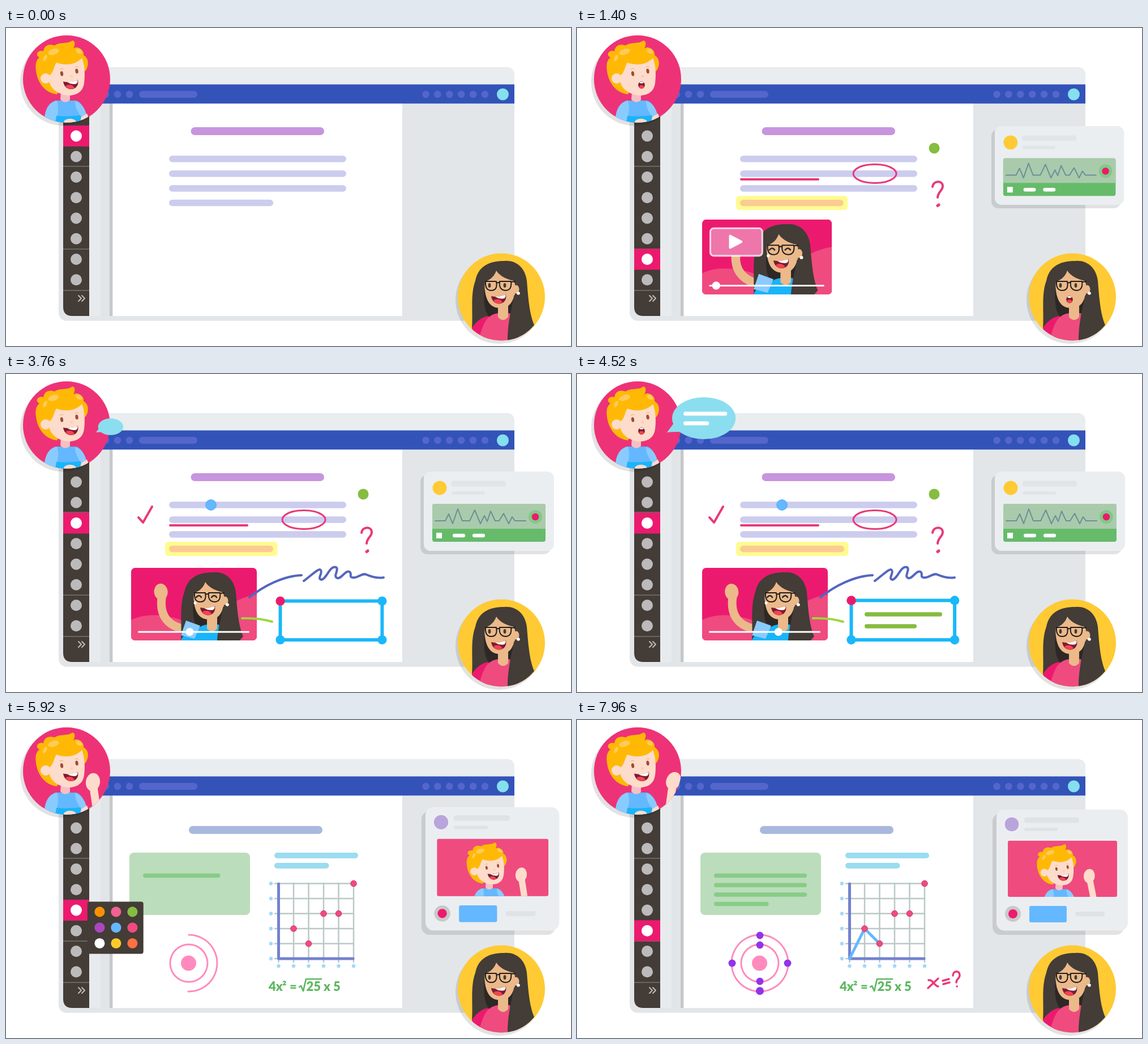
Animation of 998x561 px, one loop 8 s. Source, as an HTML page:

```html
<!DOCTYPE html>
<html lang="en">
<head>
<meta charset="utf-8">
<title>Shared whiteboard lesson</title>
<style>
html, body { margin: 0; width: 100%; height: 100%; overflow: hidden; background: #fff; }
svg { display: block; width: 100vw; height: 100vh; }
path, line { stroke-linecap: round; stroke-linejoin: round; }
text { font: 900 22px Lato, sans-serif; fill: #5cb85f; }
</style>
</head>
<body>
<svg id="stage" viewBox="0 0 998 561"></svg>
<script>
const LOOP = 8000;
const PINK = '#ec1a6e', ROSE = '#ef4b7f', DARK = '#433c37', SKIN = '#fddccb', TAN = '#ecb98a',
      BLUE = '#64b8ff', INK = '#e8397a', GREEN = '#86bc40', INDIGO = '#5566bf', SHADOW = 'rgba(0,0,0,.115)';

// ---------- shape helpers ----------
const attr = (id, extra = '') => (id ? ` id="${id}"` : '') + ' ' + extra;
const rect = (x, y, x2, y2, fill, r = 0, id, extra) =>
  `<rect x="${x}" y="${y}" width="${x2 - x}" height="${y2 - y}" rx="${r}" fill="${fill}"${attr(id, extra)}/>`;
const dot = (x, y, r, fill, id, extra) => `<circle cx="${x}" cy="${y}" r="${r}" fill="${fill}"${attr(id, extra)}/>`;
const oval = (x, y, rx, ry, fill, turn = 0) =>
  `<ellipse cx="${x}" cy="${y}" rx="${rx}" ry="${ry}" fill="${fill}" transform="rotate(${turn} ${x} ${y})"/>`;
const fill = (d, color) => `<path d="${d}" fill="${color}"/>`;
const pen = (d, color, w = 4, id, extra) =>
  `<path d="${d}" fill="none" stroke="${color}" stroke-width="${w}"${id ? ' pathLength="1"' : ''}${attr(id, extra)}/>`;
const bar = (x, x2, y, h, color, id) => pen(`M${x + h / 2},${y}H${x2 - h / 2}`, color, h, id);
const group = (id, ...parts) => `<g${attr(id)}>${parts.join('')}</g>`;
const place = (transform, ...parts) => `<g transform="${transform}">${parts.join('')}</g>`;
const clip = (name, ...parts) => `<g clip-path="url(#${name})">${parts.join('')}</g>`;
const range = (n, f) => Array.from({ length: n }, (_, i) => f(i)).join('');

// ---------- characters ----------
const smile = fill('M0,0Q14,3 26,-3C28,7 22,13 15,13.5C7,14 1,8 0,0Z', '#7d1b33') +
  fill('M7,1Q16,1 25.5,-2.5Q26,2 23,4Q15,6 7,1Z', '#fff') +
  fill('M4,8C8,4 17,5 20,11C15,15 8,14 4,8Z', '#f4434f');
const gasp = oval(13, 6, 5.8, 6.5, '#7d1b33') + oval(13, 9.2, 4, 3, '#f4434f') + oval(13, 1.6, 3.6, 1.6, '#fff');
const mouth = (x, y, who) => place(`translate(${x} ${y})`, group(who && who + 'Smile', smile),
  who ? group(who + 'Gasp', gasp) : '');

const boy = who => [
  fill('M67,168C70,145 74,132 88,128L124,128C135,132 140,144 146,168Z', BLUE),
  fill('M67,168C68,146 73,132 90,128C94,140 92,152 86,168Z', '#8acbff'),
  fill('M122,129C134,132 139,142 142,152L133,158C127,148 122,140 122,129Z', '#8acbff'),
  fill('M89,155Q108,157 132,154L134,168H87Z', '#1ab4fa'),
  fill('M133,157L143,151L150,168H130Z', SKIN), oval(113, 166, 11, 6, SKIN),
  fill('M97,112H113V127Q104,135 96,126Z', '#f7bfc4'),
  group(who && who + 'Head',
    fill('M90,117C70,115 56,98 53,76C51,62 54,56 59,52C49,46 59,38 66,41C68,29 78,28 86,31C93,24 110,29 117,22C123,23 122,30 119,36C129,30 139,42 137,48C148,54 146,69 140,76L110,80Z', '#ffb905'),
    fill('M76,84C84,80 84,68 89,61C108,68 125,63 134,53C139,65 140,82 138,97C136,113 124,119 111,119C94,118 81,109 77,97Z', SKIN),
    dot(70, 89, 9, SKIN), oval(84, 42, 10, 5, '#fecb5a', -18), oval(129, 41, 6, 3.8, '#fecb5a', 30),
    oval(69, 53, 3, 6, '#fecb5a', 25),
    group(who && who + 'Eyes', oval(98.5, 80.5, 2.6, 4.3, '#a04c34', -8), oval(125, 76, 2.6, 4.3, '#a04c34', -8)),
    pen('M95,73Q98,70 101,72M122,69Q125,67 128,69', '#f0ab69', 1), oval(116, 85, 3, 2, '#fbcdbb'),
    mouth(101, 94.5, who))
].join('');

const girl = (shirt, sleeve, who) => [
  fill('M838,440H900L892,525H838Z', '#2d2826'),
  fill('M823,530Q834,508 853,508V552H838Q828,545 823,530Z', sleeve),
  fill('M835,552C842,520 850,505 870,503H890L905,552Z', shirt),
  fill('M869,485H887V510Q878,520 869,510Z', TAN),
  group(who && who + 'Head',
    fill('M845,446Q858,440 866,427Q876,442 900,446C900,478 893,494 873,494C852,494 845,476 845,446Z', TAN),
    who ? group(who + 'Eyes', oval(854, 454, 2.4, 4, DARK), oval(881, 454, 2.4, 4, DARK))
        : pen('M850,455Q855,449 859,455M877,455Q882,449 886,455', '#2d2826', 2.5),
    mouth(857, 473, who)),
  fill('M866,428C862,440 852,446 846,447C844,470 842,492 852,508C839,510 829,519 823,530C825,500 820,470 829,446C834,421 852,411 880,411Z', DARK),
  fill('M866,428C874,440 888,444 897,446C904,470 886,500 886,551C907,549 922,537 933,524C924,504 922,470 920,446C917,422 900,409 880,411C867,412 862,420 866,428Z', DARK),
  oval(901, 461, 5.5, 7.5, TAN), fill('M893,450H899V470L893,478Z', TAN),
  pen('M847,447H866Q869,463 857,463Q846,463 847,447ZM872,447H892Q894,463 882,463Q870,462 872,447ZM867,450Q870,448 872,450M893,448L899,447', '#211d1b', 2),
  dot(905, 468, 2.8, '#fff')
].join('');

const wavingArm = id => group(id, pen('M161,185C163,160 157,140 154,115', SKIN, 14), oval(153, 107, 12.5, 16, SKIN, 8));

// ---------- window ----------
const toolY = i => 190.5 + 36.25 * i;
const frame = [
  rect(93, 69, 898, 516.5, '#e2e6e9', 14), fill('M93,100V83Q93,69 107,69H884Q898,69 898,83V100Z', '#e9edf0'),
  rect(147, 133, 183, 508, '#e8ebed'), rect(167, 133, 183, 508, '#e2e5e8'),
  rect(183, 133, 188.5, 508, '#c6c8ca'), rect(188.5, 133, 700, 508, '#fff')
].join('');
const chrome = [
  rect(101, 99.5, 898, 133.3, '#3353b9'),
  range(3, i => dot(176 + 21 * i, 117, 6.3, '#5566cb')), bar(235, 338, 117, 12, '#5566cb'),
  range(6, i => dot(741.5 + 20.9 * i, 117, 6.3, '#5566cb')), dot(877.5, 117, 10.5, '#84dfef'),
  fill('M101,133H147V508H117Q101,508 101,492Z', DARK),
  [244, 390, 463].map(y => rect(101, y - .6, 147, y + .6, '#85807d')).join(''),
  range(8, i => dot(124, toolY(i), 10, '#bcbabb')),
  group('tool', rect(101, -18.5, 147, 18.5, PINK), dot(124, 0, 10, '#fff')),
  pen('M128,472l5,5l-5,5M134,472l5,5l-5,5', '#bcbabb', 2)
].join('');

// ---------- first page ----------
const video = group('video', clip('videoClip',
  rect(221, 342, 443, 470, PINK),
  fill('M221,434C248,420 290,424 330,442C370,440 385,398 443,389V470H221Z', ROSE),
  group('videoArm', pen('M281,390C272,425 288,448 325,453', TAN, 15), oval(280, 382, 12, 14.5, TAN)),
  place('translate(-514 -61)', girl('#1ab4fa', '#1ab4fa')),
  fill('M318,435L343,444L333,467L309,461Z', '#8acbff'),
  dot(334, 404, 2.5, '#fff')),
  bar(233, 430, 455, 3, '#fff'), dot(0, 455, 7, '#fff', 'knob'),
  group('play', rect(235, 357, 324, 404, '#ee76ab', 6, '', 'stroke="#fff" stroke-opacity=".75" stroke-width="3"'),
    pen('M269,370V390L288,380Z', '#fff', 4), fill('M269,370V390L288,380Z', '#fff')));

const page1 = group('page1',
  bar(326.5, 562, 182, 14, '#c795dd'),
  [231, 257, 283].map(y => bar(288, 601, y, 11.5, '#ccccee')).join(''), bar(288, 472, 308.5, 11.5, '#ccccee'),
  group('marker', rect(281, 296, 479.5, 321, '#fffb8f', 6), bar(288, 472, 308.5, 11.5, '#fbcb93')),
  pen('M290,267H426', INK, 4, 'underline'),
  pen('M526,240.5A38,16.5 0 1 0 526.1,240.5', INK, 3, 'loop'),
  pen('M628,280C630,268 646,269 646,279C646,287 638,288 637,299', INK, 4, 'ask'),
  pen('M637,313.5L639,312', INK, 5, 'askDot'),
  dot(631, 212, 9.5, GREEN, 'greenDot'),
  dot(362, 231, 9.3, BLUE, 'blueDot', 'stroke="#46a5f5"'),
  pen('M234,253L242,262L258,234', INK, 4, 'check'),
  video,
  pen('M430,394C455,374 490,356 522,355', INDIGO, 4, 'swoop'),
  pen('M526,365C540,355 553,341 556,346C560,352 549,360 557,363C566,362 572,337 583,341C589,345 577,357 585,360C593,362 599,345 607,349C612,353 605,358 612,359C622,361 628,350 637,354C645,357 655,361 667,359', INDIGO, 4, 'squiggle'),
  pen('M417,431Q447,430 470,437', '#9bd83a', 4, 'lime'),
  group('textBox', rect(484.5, 399.5, 667, 469, 'none', 0, '', 'stroke="#1ab8fa" stroke-width="6"'),
    dot(667, 399.5, 8.2, '#1ab8fa'), dot(484.5, 469, 8.2, '#1ab8fa'), dot(667, 469, 8.2, '#1ab8fa'), dot(484.5, 399.5, 8.2, PINK)),
  bar(508, 645, 424, 7.5, GREEN, 'note1'), bar(508, 600, 445, 7.5, GREEN, 'note2'));

// ---------- second page ----------
const gx = i => 481.5 + 26.5 * i, gy = i => 421 - 26.5 * i;
const points = [[1, 2], [2, 1], [3, 3], [4, 3], [5, 5]];
const electrons = [[323, 397], [323, 461], [274, 429], [372, 429], [323, 380], [323, 478]];
const page2 = group('page2',
  bar(323, 559, 194, 14, '#a9b8de'), rect(218, 234, 431, 344, '#bbddbb', 8),
  range(4, i => bar(242, i < 3 ? 406 : 338.5, 274.5 + 16.7 * i, 7.5, '#88cc88', 'row' + i)),
  bar(474, 622, 239, 10, '#9adcf0'), bar(474, 570.5, 257, 10, '#9adcf0'),
  range(6, i => pen(`M475,${gy(i)}H614M${gx(i)},288V427`, '#bbc8c8', 2.5)),
  range(6, i => dot(468, gy(i), 3.2, '#a5d8fb') + dot(gx(i), 434, 3.2, '#a5d8fb')),
  pen('M481.5,289V421H613', '#7382cf', 5),
  pen(`M${gx(0)},${gy(0)}L${gx(1)},${gy(2)}L${gx(2)},${gy(1)}`, BLUE, 5, 'graph'),
  points.map(([i, j]) => dot(gx(i), gy(j), 5.3, ROSE, '', 'stroke="#d93068"')).join(''),
  dot(322.5, 429, 13.5, '#ff8bbd'),
  [33, 50].map((r, i) => pen(`M323,${429 - r}A${r},${r} 0 1 1 322.9,${429 - r}`, '#ff8bbd', 3, 'ring' + i)).join(''),
  electrons.map(([x, y], i) => dot(x, y, 6.5, '#9333ea', 'electron' + i)).join(''),
  [[464, '4x'], [488, '²'], [501, '='], [530.5, '25'], [561, 'x'], [578, '5']]
    .map(([x, s]) => `<text x="${x}" y="478">${s}</text>`).join(''),
  pen('M518,471L521,469L525,478L530,457H557', '#5cb85f', 2.7),
  pen('M621,459C628,457 632,470 638,470M638,456L620,473M646,460L657,457M647,466L658,463M664,451C664,442 676,441 676,450C676,457 670,456 670,463M671,470l.2,0', INK, 3.5, 'answer'));

const palette = group('palette', rect(143, 316.5, 266.5, 431.5, DARK, 5),
  ['#ff9100', '#f06292', GREEN, '#ab47bc', BLUE, ROSE, '#fff', '#ffca28', '#ff7043']
    .map((c, i) => dot(170 + 36.2 * (i % 3), 339 + 34.7 * Math.floor(i / 3), 11.3, c)).join(''));

// ---------- side cards, bubble, portraits ----------
const card1 = group('card1',
  rect(732, 178, 962, 318, SHADOW, 12), rect(738, 172, 968, 312, '#ebeef1', 12),
  dot(766, 201, 12.5, '#ffca33'), rect(787, 188.5, 883, 198.5, '#e2e5e7', 3), rect(787, 207, 846, 213, '#e2e5e7', 3),
  rect(753, 229, 953, 296, '#66bb6a', 4), fill('M753,273V233Q753,229 757,229H949Q953,229 953,233V273Z', '#a9cbab'),
  pen('M758,259H776L782,247L789,264L798,238L806,259H819L828,240L838,264L845,250L850,260L856,242L864,259H871L879,246L888,264L894,252L899,259H918', '#6b8f9b', 2),
  dot(935, 252, 12, '#82c986'), dot(935, 252, 6.3, PINK),
  rect(760, 280, 770, 290, '#fff'), bar(789, 811, 285, 6.5, '#fff'), bar(824, 846, 285, 6.5, '#fff'));
const card2 = group('card2',
  rect(734, 165, 966, 379, SHADOW, 14), rect(741, 158, 973, 371.5, '#ebeef1', 14),
  dot(768, 184, 13, '#b9a5dc', '', 'stroke="#f6f5fa"'),
  rect(790, 172, 887, 181.5, '#e0e3e6', 4), rect(790, 190, 849, 196, '#e0e3e6', 3),
  rect(761, 213, 954, 312, ROSE, 3),
  clip('photoClip', place('translate(773 202.5) scale(.75)', boy()), place('translate(786 190.5) scale(.79)', wavingArm('cardArm'))),
  dot(770, 342, 14, '#cac8c9'), dot(770, 342, 8, PINK), rect(799, 328, 865, 357, BLUE, 3),
  rect(880, 338, 932, 346.5, '#e0e3e6', 4));
const bubble = group('bubble', oval(224, 78, 56, 37, '#8bdeef'), fill('M159,103L176,80L190,103Q176,101 159,103Z', '#8bdeef'),
  bar(188, 265, 70, 7, '#fff', 'talk1'), bar(188, 233, 87, 7, '#fff', 'talk2'));
const portraits = dot(102, 95.5, 77, SHADOW) + dot(107, 90, 77, '#ee3277') +
  clip('boyClip', boy('boy'), wavingArm('arm')) +
  dot(871, 480, 77, SHADOW) + dot(875, 474.5, 77, '#ffca33') + clip('girlClip', girl(ROSE, PINK, 'girl'));

const clipDef = (id, shape) => `<clipPath id="${id}">${shape}</clipPath>`;
stage.innerHTML = `<defs>
  ${clipDef('pageClip', rect(188.5, 133, 700, 508, '#000'))}${clipDef('videoClip', rect(221, 342, 443, 470, '#000', 7))}
  ${clipDef('photoClip', rect(761, 213, 954, 312, '#000', 3))}${clipDef('boyClip', dot(107, 90, 77, '#000'))}
  ${clipDef('girlClip', dot(875, 474.5, 77, '#000'))}
  <filter id="blur"><feGaussianBlur id="blurAmount" stdDeviation="0 0"/></filter></defs>` +
  frame + clip('pageClip', group('pages', page1, page2)) + chrome + palette + card1 + card2 + portraits + bubble;

// ---------- motion ----------
const el = {};
stage.querySelectorAll('[id]').forEach(node => el[node.id] = node);
const set = (id, name, value) => el[id].setAttribute(name, value);
const show = (id, on) => set(id, 'display', on ? 'inline' : 'none');
const part = (t, a, b) => Math.min(1, Math.max(0, (t - a) / (b - a)));
const ease = p => p < .5 ? 4 * p ** 3 : 1 - 4 * (1 - p) ** 3;

// Damped spring from 0 to 1 with a 12.6 % overshoot
function spring(ms) {
  if (ms <= 0) return 0;
  const a = Math.PI * ms / 270;
  return 1 - Math.exp(-.659 * a) * (Math.cos(a) + .659 * Math.sin(a));
}
function pop(id, t, start, x, y, end = LOOP) {
  const s = spring(t - start) * (1 - part(t, end, end + 160));
  show(id, s > .001);
  set(id, 'transform', `translate(${x} ${y}) scale(${s}) translate(${-x} ${-y})`);
}
function draw(id, t, a, b) {
  const p = part(t, a, b);
  show(id, p > 0);
  set(id, 'stroke-dasharray', p < 1 ? `${p} 2` : 'none');
}
const strokes = {
  underline: [80, 360], loop: [380, 640], ask: [860, 1060], askDot: [1070, 1090], swoop: [2440, 2700], squiggle: [2750, 3240],
  check: [3280, 3420], lime: [3420, 3600], note1: [3860, 4120], note2: [4120, 4320], talk1: [3860, 4060], talk2: [4060, 4220],
  ring0: [5500, 5760], ring1: [5760, 6080], answer: [6760, 7240], graph: [7480, 7900]
};
const pops = {
  greenDot: [240, 631, 212], marker: [760, 281, 321], card1: [760, 738, 318, 4680], video: [1000, 221, 470],
  blueDot: [1960, 362, 231], textBox: [3580, 484, 469], bubble: [3680, 159, 103, 4640], card2: [5730, 741, 379],
  palette: [5780, 147, 336, 6780]
};
const toolStops = [[600, 6], [1840, 3], [3260, 2], [5420, 4], [6860, 5]];
const within = (t, spans) => spans.some(([a, b]) => t >= a && t < b);
const talk = { boy: [[320, 1480], [3680, 4640]], girl: [[900, 1640], [1920, 2720], [3360, 3560]] };
const blinks = { boy: [[200, 280], [2280, 2360], [5480, 5560]], girl: [[1880, 1960], [3080, 3160], [6040, 6120]] };
const nod = (t, a, b) => Math.sin(Math.PI * part(t, a, b)) ** 2;

function render(t) {
  for (const [id, [a, b]] of Object.entries(strokes)) draw(id, t, a, b);
  for (const [id, [start, x, y, end]] of Object.entries(pops)) pop(id, t, start, x, y, end);
  electrons.forEach(([x, y], i) => pop('electron' + i, t, 6860 + 150 * i, x, y));

  let tool = 0;
  for (const [at, to] of toolStops) tool += (to - tool) * ease(part(t, at, at + 200));
  set('tool', 'transform', `translate(0 ${toolY(tool)})`);

  // The rows are typed one after another at an even pace
  for (let i = 0; i < 4; i++) draw('row' + i, t, 5480 + 535 * i, 5480 + 535 * i + (i < 3 ? 535 : 315));

  const scroll = at => 358 * ease(part(at, 4700, 5250));
  const speed = scroll(t + 10) - scroll(t - 10);
  set('page1', 'transform', `translate(0 ${-scroll(t)})`);
  set('page2', 'transform', `translate(0 ${358 - scroll(t)})`);
  show('page1', t < 5250);
  show('page2', t > 4700);
  set('pages', 'filter', speed > .1 ? 'url(#blur)' : 'none');
  set('blurAmount', 'stdDeviation', `0 ${Math.min(5, speed * .3)}`);

  const playing = Math.max(0, t - 1820);
  show('play', !playing);
  set('knob', 'cx', 245 + .041 * playing);
  const lift = playing ? -3 + 3 * Math.cos(2 * Math.PI * (t - 2760) / 704) : 0;
  set('videoArm', 'transform', `rotate(${lift} 300 448)`);

  const swing = 8.5 - 8.5 * Math.cos(2 * Math.PI * (t - 6480) / 592);
  const raise = 85 * (1 - ease(part(t, 5680, 5980)));
  set('arm', 'transform', `translate(0 ${raise}) rotate(${swing} 161 165)`);
  show('arm', t > 5680);
  set('cardArm', 'transform', `rotate(${-swing * .15} 161 165)`);

  for (const who of ['boy', 'girl']) {
    const open = within(t, talk[who]) && Math.floor(t / 160) % 2 === 0;
    show(who + 'Gasp', open);
    show(who + 'Smile', !open);
    const eyeY = who === 'boy' ? 78 : 454;
    const lid = within(t, blinks[who]) ? .15 : 1;
    set(who + 'Eyes', 'transform', `translate(0 ${eyeY * (1 - lid)}) scale(1 ${lid})`);
  }
  set('boyHead', 'transform', `rotate(${1.5 * (nod(t, 2000, 2700) + nod(t, 2800, 3360))} 104 118)`);
}
function tick() {
  render(performance.now() % LOOP);
  requestAnimationFrame(tick);
}
tick();
</script>
</body>
</html>
```
